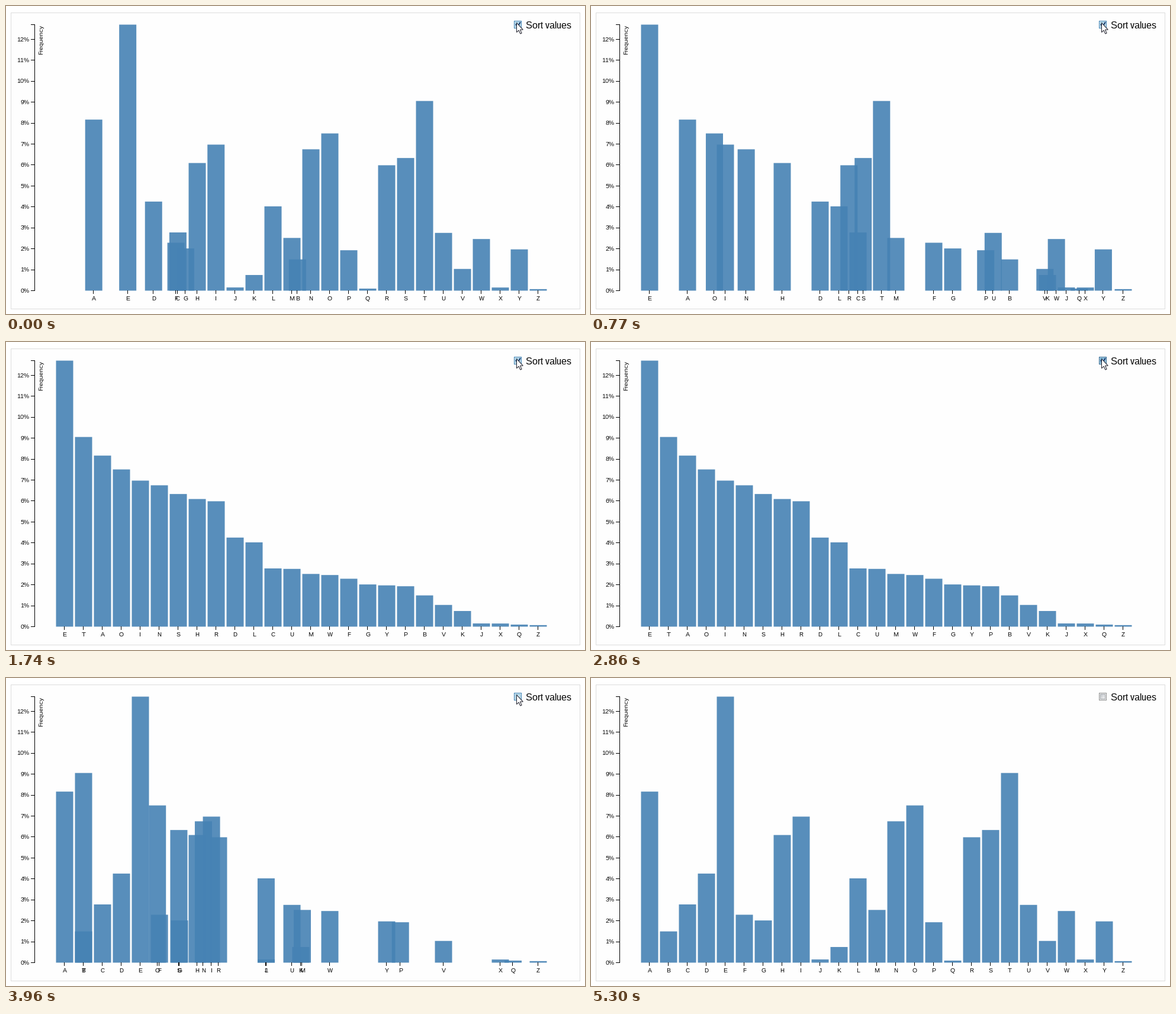
A matplotlib script for the animation above (6900 ms loop, 978 px wide and 521 px high).

```python
import numpy as np
import matplotlib.pyplot as plt
from matplotlib.animation import FuncAnimation
from matplotlib.colors import to_rgb
from matplotlib.patches import Polygon, Rectangle

WIDTH, HEIGHT, DPI = 978, 521, 64
LOOP, INTERVAL = 6900, 20
LEFT, TOP, BASE = 48.5, 31.5, 481.5
STEP, BAND, FIRST = 32, 29, 84.5
DURATION, STAGGER = 750, 50

LETTERS = "ABCDEFGHIJKLMNOPQRSTUVWXYZ"
PERCENT = np.array([
    8.167, 1.492, 2.780, 4.253, 12.702, 2.288, 2.015, 6.094, 6.973,
    0.153, 0.747, 4.025, 2.517, 6.749, 7.507, 1.929, 0.098, 5.987,
    6.333, 9.056, 2.758, 1.037, 2.465, 0.150, 1.971, 0.074])
SCALE = (BASE - TOP) / PERCENT.max()

BY_LETTER = np.arange(len(LETTERS))
BY_VALUE = np.argsort(np.argsort(-PERCENT))
UNSORT_START = 3080

plt.rcParams.update({
    "font.family": "Liberation Sans",
    "text.hinting": "native",
    "text.hinting_factor": 1,
    "toolbar": "None",
})

fig = plt.figure(figsize=(WIDTH / DPI, HEIGHT / DPI), dpi=DPI, facecolor="white")
ax = fig.add_axes([0, 0, 1, 1])
ax.set_axis_off()


def px(size):
    """Pixels to points."""
    return size * 72 / DPI


def box(x, y, w, h, color, **style):
    return ax.add_patch(Rectangle((x, y), w, h, facecolor=color, linewidth=0,
                                  snap=False, **style))


def label(x, y, text, size=10, **style):
    return ax.text(x, y, text, fontsize=px(size), color="black",
                   va="baseline", **style)


# Page frame
box(8, 11, 962, 502, "#dddddd")
box(9, 12, 960, 500, "#fefefe")

# Vertical axis
box(48, 31, 1, 451, "black")
box(42, 31, 6, 1, "black")
for value in range(13):
    row = int(BASE - value * SCALE)
    box(42, row, 6, 1, "black")
    label(39.5, round(BASE - value * SCALE + 3.2), f"{value}%", ha="right")
label(62, TOP, "Frequency", rotation=90, rotation_mode="anchor", ha="right")

# Bars with their ticks and letters
bars = [box(0, BASE - p * SCALE, BAND, p * SCALE, "steelblue", alpha=0.9)
        for p in PERCENT]
ticks = [box(0, 481, 1, 6, "black") for _ in LETTERS]
names = [label(0, 498, letter, ha="center") for letter in LETTERS]

# Checkbox: (border, ring, gradient start, gradient end)
NORMAL = ("#8e8f8f", "#f4f4f4", "#c3c7cc", "#f4f4f4")
HOVER = ("#3c7fb1", "#def2fc", "#a9d9f2", "#e6f5fd")
PRESSED = ("#2c628b", "#c2e4f6", "#6eb0da", "#c4e3f5")
DIAGONAL = np.add.outer(np.arange(9), np.arange(9))[..., None] / 16
border = box(858, 25, 13, 13, NORMAL[0])
ring = box(859, 26, 11, 11, NORMAL[1])
inner = ax.imshow(np.ones((9, 9, 3)), extent=(860, 869, 36, 27),
                  interpolation="nearest", aspect="auto", zorder=2)
check, = ax.plot([861.5, 864, 868.5], [31.5, 34.5, 28], color="#1c3f73",
                 linewidth=px(2), zorder=3)
label(878, 38, "Sort values", size=16)

ARROW = np.array([(0, 0), (0, 16), (3.6, 12.6), (6.3, 18.5), (8.6, 17.5),
                  (6, 11.6), (10.8, 11.6)])
cursor = ax.add_patch(Polygon(ARROW, facecolor="white", edgecolor="#20202c",
                              linewidth=px(1), joinstyle="miter", snap=False,
                              zorder=5))

ax.set_xlim(0, WIDTH)
ax.set_ylim(HEIGHT, 0)


def cubic_in_out(u):
    return np.where(u < 0.5, 4 * u ** 3, 1 - 4 * (1 - u) ** 3)


def bar_lefts(t):
    if t < UNSORT_START:
        start, end = BY_LETTER, BY_VALUE
        elapsed = np.interp(t, [0, 480, 1120, 1440], [460, 992, 1675, 2010])
    else:
        start, end = BY_VALUE, BY_LETTER
        elapsed = np.interp(t, [UNSORT_START, 3960, 4360, 4900],
                            [0, 963, 1410, 2000])
    u = np.clip((elapsed - BY_LETTER * STAGGER) / DURATION, 0, 1)
    return FIRST + STEP * (start + (end - start) * cubic_in_out(u))


def paint_checkbox(t):
    if t >= 5040:
        style = NORMAL
    elif 2860 <= t < 3100:
        style = PRESSED
    else:
        style = HOVER
    border.set_facecolor(style[0])
    ring.set_facecolor(style[1])
    light, dark = (np.array(to_rgb(c)) for c in (style[3], style[2]))
    shade = dark + (light - dark) * DIAGONAL
    edge = dark * 0.85
    shade[[0, -1]] = edge
    shade[:, [0, -1]] = edge
    inner.set_data(shade)
    check.set_visible(t < 3100)


def update(frame):
    t = frame * INTERVAL
    for bar, tick, name, left in zip(bars, ticks, names, bar_lefts(t)):
        center = left + BAND / 2
        bar.set_x(left)
        tick.set_x(np.floor(center - 0.5))
        name.set_x(center)
    paint_checkbox(t)
    moments = [4980, 5190, 5240]
    tip = (np.interp(t, moments, [862.5, 930.5, 952.5]),
           np.interp(t, moments, [28.5, 22.5, 22.5]))
    cursor.set_xy(ARROW + tip)
    cursor.set_visible(t < 5300)
    return [*bars, *ticks, *names, border, ring, inner, check, cursor]


animation = FuncAnimation(fig, update, frames=LOOP // INTERVAL,
                          interval=INTERVAL, repeat=True, repeat_delay=0)
plt.show()
```
